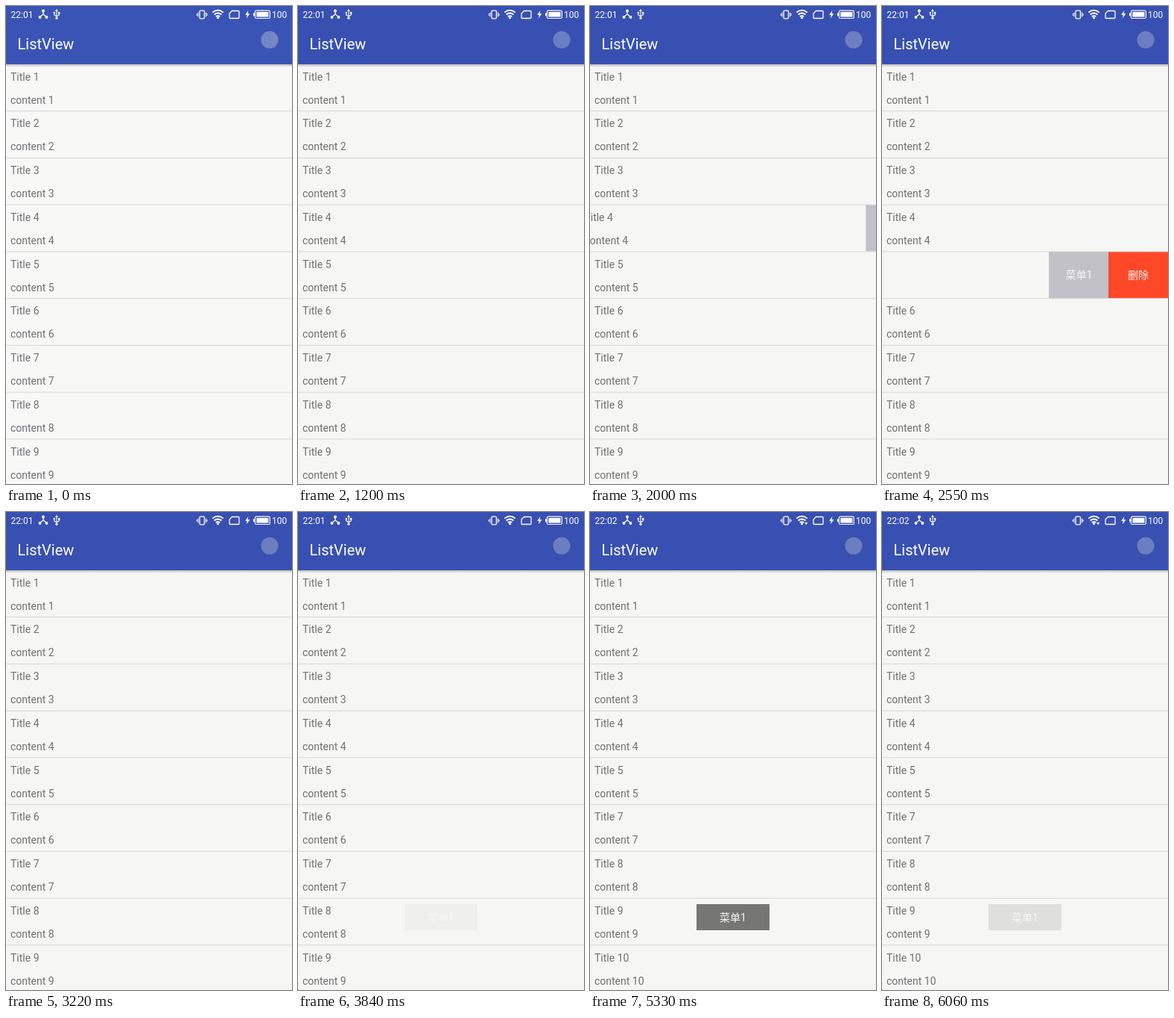
Write an HTML page that moves like this. It is 384 px wide and 640 px high and loops after 6130 ms.

```html
<!DOCTYPE html>
<html lang="zh-CN">
<head>
<meta charset="utf-8">
<style>
html, body { margin: 0; width: 100%; height: 100%; overflow: hidden; }
svg {
  --bg: #f6f6f4; --bar: #3850b1; --dot: #6b7ec1;
  display: block; width: 384px; height: 640px; background: var(--bg);
  font-family: Roboto, "Noto Sans CJK SC", "Noto Sans CJK", sans-serif;
}
svg.bright { --bg: #f8f8f7; --bar: #3a54b6; --dot: #7386c8; }
.rows { font-size: 14px; fill: #717175; }
.menu, .toast { font-size: 14px; fill: #f8f8f8; text-anchor: middle; }
.line { fill: none; stroke: #fff; }
</style>
</head>
<body>
<svg id="stage" viewBox="0 0 384 640">
  <defs>
    <linearGradient id="shade" x2="0" y2="1">
      <stop stop-color="#000" stop-opacity=".24"/>
      <stop offset="1" stop-color="#000" stop-opacity="0"/>
    </linearGradient>
  </defs>
  <g id="rows" class="rows"></g>
  <g id="lines" fill="#d6d6d5"></g>
  <rect y="78" width="384" height="4" fill="url(#shade)"/>
  <rect width="384" height="78" fill="var(--bar)"/>
  <circle cx="354" cy="45.3" r="11.8" fill="var(--dot)" stroke="#000" stroke-opacity=".06" stroke-width="1.5"/>
  <g fill="#fff" stroke-width="1.3">
    <text id="clock" x="6.5" y="16" font-size="12">22:01</text>
    <text x="357" y="16" font-size="12">100</text>
    <text x="15.6" y="58" font-size="20">ListView</text>
    <!-- branch -->
    <path class="line" d="M50 6V11L45 15M50 11L55 15"/>
    <circle cx="50" cy="6.5" r="2"/><circle cx="45.5" cy="15" r="1.9"/><circle cx="54.5" cy="15" r="1.9"/>
    <!-- usb -->
    <path class="line" stroke-width="1.1" d="M68 6V16M64.8 9V12L68 14L71.2 12V9"/>
    <path d="M66 7L68 4L70 7Z"/><circle cx="68" cy="16.2" r="1.6"/><circle cx="64.8" cy="9" r="1.2"/><rect x="70" y="8" width="2.4" height="2.4"/>
    <!-- vibrate -->
    <rect class="line" x="260" y="6.2" width="6.4" height="10.6" rx="1"/>
    <path class="line" stroke-width="1" d="M258 8.5V14.5M268.5 8.5V14.5M256.4 10V13M270 10V13"/>
    <!-- wifi -->
    <path class="line" stroke-width="1.8" d="M277.3 8.6Q284.5 2.6 291.7 8.6M279.6 11.5Q284.5 7.4 289.4 11.5M281.8 14.2Q284.5 12 287.2 14.2"/>
    <circle cx="284.5" cy="15.7" r="1.5"/>
    <path id="traffic" d="M288 14H292.4L290.2 17.2Z"/>
    <!-- sim -->
    <path class="line" d="M303.5 6.5H312Q313 6.5 313 7.5V15.5Q313 16.5 312 16.5H301Q300 16.5 300 15.5V10Z"/>
    <!-- battery -->
    <path d="M325.3 6L321.2 12H323.8L322.8 16.6L327.4 10.3H324.6Z"/>
    <rect class="line" x="334.4" y="6.1" width="20" height="10.4" rx="1.6" stroke-width="1.1"/>
    <rect x="336.3" y="8" width="16.2" height="6.6"/><rect x="332" y="9.3" width="1.8" height="4"/>
  </g>
  <g id="toast" class="toast">
    <rect x="143" y="525" width="98" height="35" fill="#767674"/>
    <text x="192" y="548">菜单1</text>
  </g>
</svg>
<script>
const LOOP = 6130, TOP = 78, PITCH = 62.75, MENU = 160, GONE = 6;
const $ = id => document.getElementById(id);

// Each swipe slides the menu in at "open" and out at "shut"
const swipes = [
  { row: 4, open: 1230, openMs: 450, shut: 1800, shutMs: 245 },
  { row: 5, open: 2130, openMs: 400, shut: 2830, shutMs: 245 },
  { row: 6, open: 3230, openMs: 450, shut: 3838, shutMs: 1 },
  { row: 6, open: 4306, openMs: 178, shut: 5000, shutMs: 1 }
];

// Smooth 0 to 1 beginning at "from"
function ease(t, from, ms) {
  const u = Math.min(1, Math.max(0, (t - from) / ms));
  return u * u * (3 - 2 * u);
}

for (let n = 1; n <= 10; n++) {
  $("rows").innerHTML += `<g>
    <text x="6" y="21.5">Title ${n}</text><text x="6" y="52.5">content ${n}</text>
    <g class="menu">
      <rect x="384" width="80" height="62" fill="#c2c1c8"/><text x="424.5" y="36">菜单1</text>
      <rect x="464" width="80" height="62" fill="#ff4828"/><text x="504" y="36">删除</text>
    </g></g>`;
  $("lines").innerHTML += `<rect y="${TOP + n * PITCH - .6}" width="384" height="1"/>`;
}
const rows = [...$("rows").children];

function draw(t) {
  const deleted = t >= 5000;
  rows.forEach((row, i) => {
    const n = i + 1;
    const slot = deleted && n > GONE ? i - 1 : i;
    const x = swipes.filter(s => s.row === n).reduce((sum, s) =>
      sum + MENU * (ease(t, s.open, s.openMs) - ease(t, s.shut, s.shutMs)), 0);
    row.setAttribute("transform", `translate(${-x} ${TOP + slot * PITCH})`);
    row.style.display = deleted && n === GONE ? "none" : "";
  });
  $("toast").setAttribute("opacity", ease(t, 3790, 390) - ease(t, 5860, 275));
  $("clock").textContent = t < 5330 ? "22:01" : "22:02";
  $("traffic").style.display = t < 5330 ? "none" : "";
  $("stage").classList.toggle("bright", t < 140);
}

const start = performance.now();
function tick() {
  draw((performance.now() - start) % LOOP);
  requestAnimationFrame(tick);
}
tick();
</script>
</body>
</html>
```
